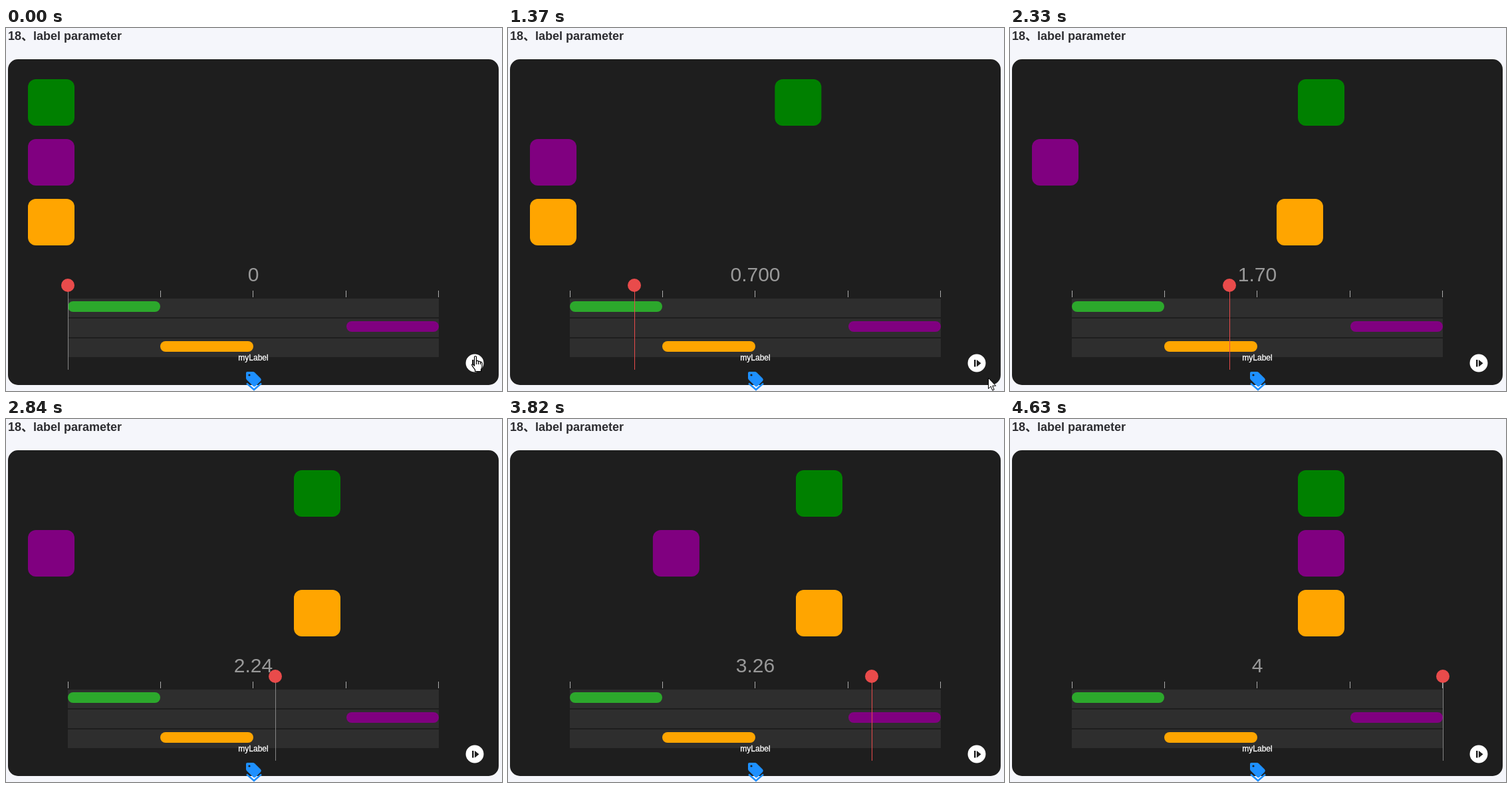
Recreate the animation shown at these times as an HTML page. Size 746 by 546 pixels, loop 4780 ms.

```html
<!DOCTYPE html>
<html lang="en">
<head>
<meta charset="utf-8">
<title>Label parameter</title>
<style>
html, body { margin: 0; width: 100%; height: 100%; overflow: hidden; background: #f5f6fb; }
svg { display: block; font-family: "Liberation Sans", Arial, "Noto Sans CJK SC", "Noto Sans CJK", sans-serif; }
</style>
</head>
<body>
<svg width="746" height="546" viewBox="0 0 746 546">
  <text x="3" y="18" font-size="18" font-weight="bold" fill="#2c2c30">18、label parameter</text>
  <rect x="3" y="47" width="738" height="490" rx="15" fill="#1e1e1e"/>

  <rect id="green" x="33" y="77" width="70" height="70" rx="12" fill="green"/>
  <rect id="purple" x="33" y="167" width="70" height="70" rx="12" fill="purple"/>
  <rect id="orange" x="33" y="257" width="70" height="70" rx="12" fill="orange"/>

  <text id="clock" x="372" y="381" font-size="30" text-anchor="middle" fill="#999"></text>
  <path d="M93.5 395v10M232.5 395v10M371.5 395v10M511.5 395v10M650.5 395v10" stroke="#aaa"/>
  <path d="M93 407h558v28H93zM93 437h558v28H93zM93 467h558v28H93z" fill="#2e2e2e"/>
  <rect x="93" y="411" width="139" height="16" rx="8" fill="#2ca82c"/>
  <rect x="512" y="441" width="139" height="16" rx="8" fill="purple"/>
  <rect x="232" y="471" width="140" height="16" rx="8" fill="orange"/>

  <text x="372" y="500" font-size="12" text-anchor="middle" fill="#fff" stroke="#fff" stroke-width=".3">myLabel</text>
  <path d="M363 517h8q2 0 3.200 1.200l8.800 8.800q1.800 2 0 4l-7.500 7.500q-2 1.800-4 0l-9.300-9.300q-1.200-1.200-1.200-3v-7.200q0-2 2-2z" fill="#1e90ff"/>
  <circle cx="366" cy="522" r="1.600" fill="#1e1e1e"/>
  <path d="M362 534.500l11 9.500 11-9.500" fill="none" stroke="#1e90ff" stroke-width="2.500"/>

  <g id="playhead">
    <path id="needle" d="M.5 387v127"/>
    <circle cy="387" r="10" fill="#e94b4b"/>
  </g>

  <circle cx="705" cy="504" r="13.500" fill="#fff"/>
  <path d="M701 499h2.500v10.500H701zM705 499l6.500 5.200-6.500 5.300z" fill="#1e1e1e"/>
  <path id="hand" d="M704.500 508V495q0-1.500 1.500-1.500t1.500 1.500v6q2.500-1.500 3 .7q2.300-1 3 .8q2.500-.5 2.500 2v5q0 2-1.500 4v3h-9v-2.500q-3-3.500-5-7.500q1-2 4 1.500zM707.500 501v5M710.500 502v4M713.500 503v3"
    fill="#fff" stroke="#000" stroke-width="1.200" stroke-linejoin="round"/>
  <path id="arrow" d="M.5.500v16l3.700-3.500 2.500 6 2.500-1-2.500-5.800h5z" fill="#fff" stroke="#000"/>
</svg>
<script>
const LOOP = 4780, PLAY = 830, LEAVE = 1250, GONE = 1640; // ms
const DURATION = 4; // timeline length in s
const starts = { green: 0, orange: 1, purple: 3 };

const el = id => document.getElementById(id);
const show = (id, on) => el(id).setAttribute("visibility", on ? "visible" : "hidden");
const moveTo = (id, x, y = 0) => el(id).setAttribute("transform", `translate(${x} ${y})`);
const easeOut = p => 1 - (1 - p) ** 2;

function draw(ms) {
  // The timeline is already under way when its first change appears.
  const pos = ms < PLAY ? 0 : Math.min(DURATION, 0.00104 * (ms - 680));
  let active = false;
  for (const [id, start] of Object.entries(starts)) {
    const p = Math.min(1, Math.max(0, pos - start));
    moveTo(id, 400 * easeOut(p));
    if (p > 0 && p < 1) active = true;
  }

  // The readout and playhead snap to fiftieths of a second.
  const shown = Math.floor(pos * 50) / 50;
  el("clock").textContent = Number.isInteger(shown) ? shown : shown.toPrecision(3);
  moveTo("playhead", Math.floor(93 + 139.5 * shown));
  el("needle").setAttribute("stroke", active ? "#e94b4b" : "#858585");

  show("hand", ms < LEAVE);
  show("arrow", ms >= LEAVE && ms < GONE);
  moveTo("arrow", 722, Math.round(514 + (ms - LEAVE) / 10));
}

const begin = performance.now();
function tick() {
  draw((performance.now() - begin) % LOOP);
  requestAnimationFrame(tick);
}
tick();
</script>
</body>
</html>
```
